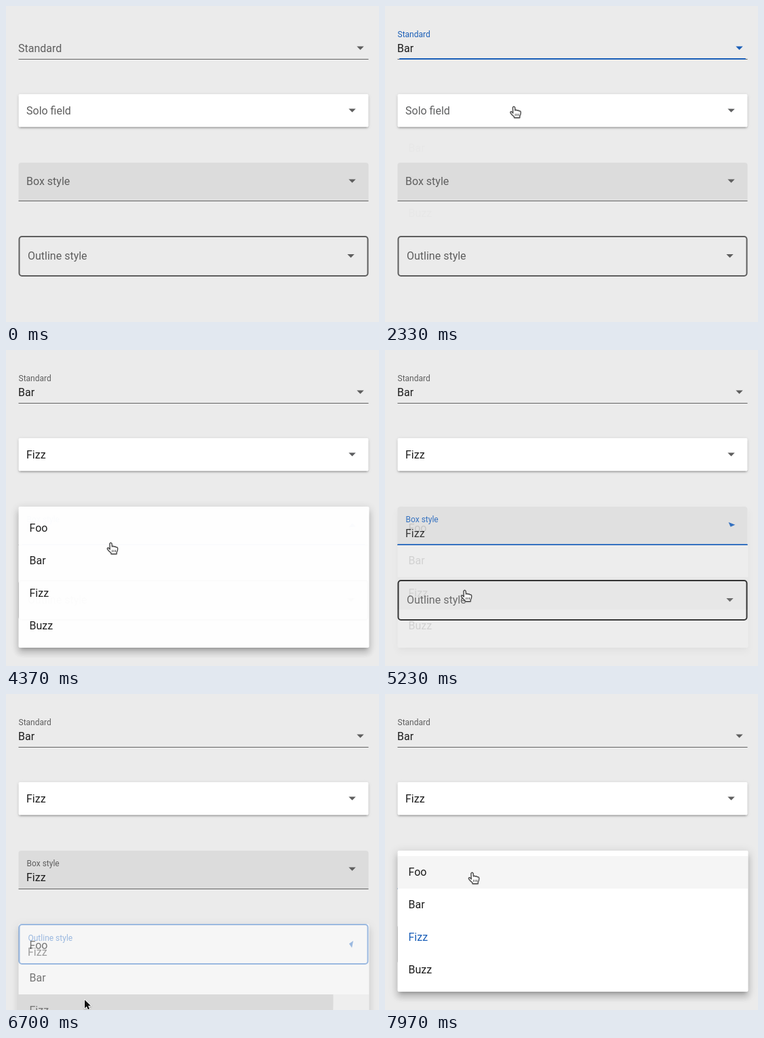
An HTML page with a canvas that plays this animation: 550x466 px, repeating every 8000 ms.

```html
<!DOCTYPE html>
<html lang="en">
<head>
<meta charset="utf-8">
<title>Select fields</title>
<style>
  html, body { margin: 0; width: 550px; height: 466px; overflow: hidden; background: #ebebeb; }
  canvas { display: block; width: 550px; height: 466px; }
</style>
</head>
<body>
<canvas id="stage"></canvas>
<script>
const W = 550, H = 466, LOOP = 8000, FADE = 300;
const LEFT = 18.5, RIGHT = 534.5, ROW = 48;
const ITEMS = ['Foo', 'Bar', 'Fizz', 'Buzz'];
const GREY = [94, 94, 94], LINE = [98, 98, 98], DARK = [30, 30, 30], BLUE = [25, 94, 184];
const INK = '#1c1c1c';

const FIELDS = [
  { kind: 'standard', label: 'Standard', x: 18, y: 62, floatY: 42, valueY: 62, arrow: 522, top: 46, bottom: 80, menu: 46 },
  { kind: 'solo', label: 'Solo field', x: 30, y: 154, floatY: 154, valueY: 154, arrow: 510, top: 130, bottom: 178, menu: 130 },
  { kind: 'box', label: 'Box style', x: 30, y: 258, floatY: 250, valueY: 270, arrow: 510, top: 231, bottom: 288, menu: 231 },
  { kind: 'outline', label: 'Outline style', x: 32, y: 368.5, floatY: 360, valueY: 380, arrow: 508, top: 339, bottom: 399, menu: 339 }
];

// Each visit to a field: menu opens, an item is pressed, menu closes.
const VISITS = [
  { field: 0, open: 560, press: 1380, close: 1550, pick: 1 },
  { field: 1, open: 2330, press: 3270, close: 3410, pick: 2 },
  { field: 2, open: 4170, press: 4970, close: 5110, pick: 2 },
  { field: 3, open: 5770, press: 6600, close: 6660, pick: 2 },
  { field: 2, open: 7630, press: Infinity, close: Infinity, pick: 2 }
];

// Pointer stops: time, x, y
const PATH = [
  [50, 556, -16], [480, 456, 56], [910, 456, 56], [1200, 305.5, 124],
  [1560, 305.5, 124], [2000, 190, 148], [2450, 190, 148], [2850, 168.5, 262],
  [3480, 168.5, 262], [3830, 160, 258], [4200, 160, 258], [4370, 154.5, 284],
  [4720, 140, 350], [5080, 140, 350], [5230, 117.5, 354], [5480, 115, 362],
  [5900, 115, 362], [6560, 116, 451], [6720, 116, 451], [7370, 128.5, 263]
];

const HAND = new Path2D('M-1.6 1.6Q0-1.2 1.6 1.6L1.9 6Q3.5 4.4 4.7 6.2Q6.4 5 7.5 6.9Q10.2 6.2 10.2 9' +
  'Q10.2 12 8.7 14.2V16.8H.5V15.2Q-3 12.6-5 9.6Q-5.6 7.4-3.4 7.8L-1.2 10Z');
const KNUCKLES = new Path2D('M2.2 10.8V14M4.6 10.8V14M7 10.8V14');
const ARROW = new Path2D('M0 0V12.4L2.9 9.7L4.9 14.3L7.1 13.3L5.1 8.8H9Z');

const canvas = document.getElementById('stage');
const layer = document.createElement('canvas');
const scale = window.devicePixelRatio || 1;
for (const c of [canvas, layer]) {
  c.width = W * scale;
  c.height = H * scale;
  c.getContext('2d').scale(scale, scale);
}
const main = canvas.getContext('2d'), sheet = layer.getContext('2d');

const clamp = v => Math.min(1, Math.max(0, v));
const lerp = (a, b, k) => a + (b - a) * k;
const rgb = c => `rgb(${c.map(Math.round)})`;
const mix = (a, b, k) => rgb(a.map((v, i) => lerp(v, b[i], k)));
const shade = a => `rgba(0,0,0,${a})`;

// cubic-bezier(.25, .8, .25, 1)
function swift(p) {
  if (p <= 0) return 0;
  if (p >= 1) return 1;
  const curve = (s, a, b) => 3 * (1 - s) ** 2 * s * a + 3 * (1 - s) * s * s * b + s ** 3;
  let lo = 0, hi = 1;
  for (let i = 0; i < 20; i++) {
    const mid = (lo + hi) / 2;
    if (curve(mid, .25, .25) < p) lo = mid; else hi = mid;
  }
  return curve(lo, .8, 1);
}
const since = (t, start) => swift((t - start) / FADE);

function pointerAt(t) {
  let i = PATH.findIndex(p => p[0] > t);
  if (i < 0) i = PATH.length;
  const a = PATH[Math.max(0, i - 1)], b = PATH[Math.min(i, PATH.length - 1)];
  const k = b[0] > a[0] ? clamp((t - a[0]) / (b[0] - a[0])) : 0;
  const e = k * k * (3 - 2 * k);
  return { x: lerp(a[1], b[1], e), y: lerp(a[2], b[2], e) };
}

function stateOf(index, t) {
  const s = { focus: 0, open: 0, float: 0, value: '' };
  VISITS.forEach((v, i) => {
    if (v.field !== index || t < v.open) return;
    const next = VISITS[i + 1];
    const shown = since(t, v.open);
    s.focus = shown * (1 - (next ? since(t, next.open) : 0));
    s.open = shown * (1 - since(t, v.close));
    s.float = s.value ? 1 : shown;
    if (t >= v.close) s.value = ITEMS[v.pick];
  });
  return s;
}

function text(c, str, x, y, size, color) {
  c.font = `${size}px Roboto, sans-serif`;
  c.fillStyle = color;
  c.fillText(str, x, y + size * .356);
}

function round(c, x, y, w, h, r) {
  c.beginPath();
  c.roundRect(x, y, w, h, r);
}

// Each shadow: offset y, blur, spread, alpha
function raised(c, x, y, w, h, shadows) {
  const away = 1000;
  c.fillStyle = '#fff';
  for (const [dy, blur, spread, alpha] of shadows) {
    // the caster stands off stage, only its shadow lands here
    c.save();
    c.shadowColor = shade(alpha);
    c.shadowBlur = blur * scale;
    c.shadowOffsetX = away * scale;
    c.shadowOffsetY = dy * scale;
    round(c, x - spread - away, y - spread, w + 2 * spread, h + 2 * spread, 2);
    c.fill();
    c.restore();
  }
  round(c, x, y, w, h, 2);
  c.fill();
}

function underline(c, y, focus, hover) {
  const w = RIGHT - LEFT;
  c.fillStyle = rgb(hover ? DARK : LINE);
  c.fillRect(LEFT, y, w, 1);
  c.fillStyle = rgb(BLUE);
  c.fillRect(LEFT + w * (1 - focus) / 2, y - 1, w * focus, 2);
}

function drawField(c, f, s, hover) {
  const w = RIGHT - LEFT;
  if (f.kind === 'standard') underline(c, 78, s.focus, hover);
  if (f.kind === 'solo') {
    raised(c, LEFT, f.top, w, 48.5, [[3, 1, -2, .2], [2, 2, 0, .14], [1, 5, 0, .12]]);
  }
  if (f.kind === 'box') {
    c.fillStyle = shade(hover ? .12 : .064);
    round(c, LEFT, f.top, w, 56, [4, 4, 0, 0]);
    c.fill();
    underline(c, 287, s.focus, hover);
  }
  if (f.kind === 'outline') {
    c.strokeStyle = mix(hover ? DARK : GREY, BLUE, s.focus);
    c.lineWidth = 2;
    round(c, LEFT + 1, f.top + 1, w - 2, 58, 4);
    c.stroke();
  }

  const tint = mix(GREY, BLUE, s.focus);
  const solo = f.kind === 'solo';
  if (!solo || !s.value) {
    const k = solo ? 0 : s.float;
    text(c, f.label, f.x + k / 2, lerp(f.y, f.floatY, k), lerp(16, 12, k), tint);
  }
  if (s.value) text(c, s.value, f.x, f.valueY, 16, INK);

  c.save();
  c.translate(f.arrow + .5, f.y + .2);
  c.rotate(Math.PI * s.open);
  c.fillStyle = tint;
  c.beginPath();
  c.moveTo(-5.2, -2.6);
  c.lineTo(5.2, -2.6);
  c.lineTo(0, 2.6);
  c.fill();
  c.restore();
}

function drawMenu(visit, s, t, pointer) {
  const c = sheet, top = FIELDS[visit.field].menu;
  const x = LEFT, w = 517, h = ROW * 4 + 16;
  c.clearRect(0, 0, W, H);
  raised(c, x, top, w, h, [[5, 5, -3, .2], [8, 10, 1, .14], [3, 14, 2, .12]]);

  const pressed = t >= visit.press;
  const row = pressed ? visit.pick : Math.floor((pointer.y - top - 8) / ROW);
  if (t - visit.open > 250 && row >= 0 && row < 4) {
    const y = top + 8 + row * ROW;
    c.save();
    c.beginPath();
    c.rect(x, y, w, ROW);
    c.clip();
    c.fillStyle = shade(pressed ? .05 : .04);
    c.fillRect(x, y, w, ROW);
    if (pressed) {
      const p = pointerAt(visit.press);
      c.fillStyle = shade(.15);
      c.beginPath();
      c.arc(p.x, p.y, 205 + 1.6 * (t - visit.press), 0, 7);
      c.fill();
    }
    c.restore();
  }

  const chosen = t < visit.close ? s.value : '';
  ITEMS.forEach((item, i) => {
    text(c, item, 34.5, top + 31.5 + i * ROW, 16, item === chosen ? rgb(BLUE) : INK);
  });

  main.save();
  main.globalAlpha = s.open;
  main.drawImage(layer, 0, 0, W, H);
  main.restore();
}

function drawPointer(c, p, hand) {
  c.save();
  c.translate(p.x, p.y);
  c.lineJoin = 'round';
  c.shadowColor = shade(.3);
  c.shadowBlur = 2 * scale;
  c.shadowOffsetY = scale;
  if (hand) {
    c.fillStyle = '#fff';
    c.fill(HAND);
    c.shadowColor = 'transparent';
    c.strokeStyle = '#4a4a4a';
    c.lineWidth = 1.4;
    c.stroke(HAND);
    c.lineWidth = 1;
    c.stroke(KNUCKLES);
  } else {
    c.strokeStyle = '#fff';
    c.lineWidth = 2;
    c.stroke(ARROW);
    c.shadowColor = 'transparent';
    c.fillStyle = '#111';
    c.fill(ARROW);
  }
  c.restore();
}

function draw(t) {
  const pointer = pointerAt(t);
  const visit = VISITS.find(v => t >= v.open && t < v.close + FADE);
  const covered = visit && t < visit.close;
  const over = f => pointer.x > LEFT && pointer.x < RIGHT && pointer.y >= f.top && pointer.y < f.bottom;
  const states = FIELDS.map((f, i) => stateOf(i, t));

  main.fillStyle = '#ebebeb';
  main.fillRect(0, 0, W, H);
  FIELDS.forEach((f, i) => drawField(main, f, states[i], !covered && over(f)));
  if (visit) drawMenu(visit, states[visit.field], t, pointer);
  if (t > 60) drawPointer(main, pointer, covered || FIELDS.some(over));
}

const start = performance.now();
function tick(now) {
  draw(Math.max(0, now - start) % LOOP);
  requestAnimationFrame(tick);
}
draw(0);
requestAnimationFrame(tick);
</script>
</body>
</html>
```
